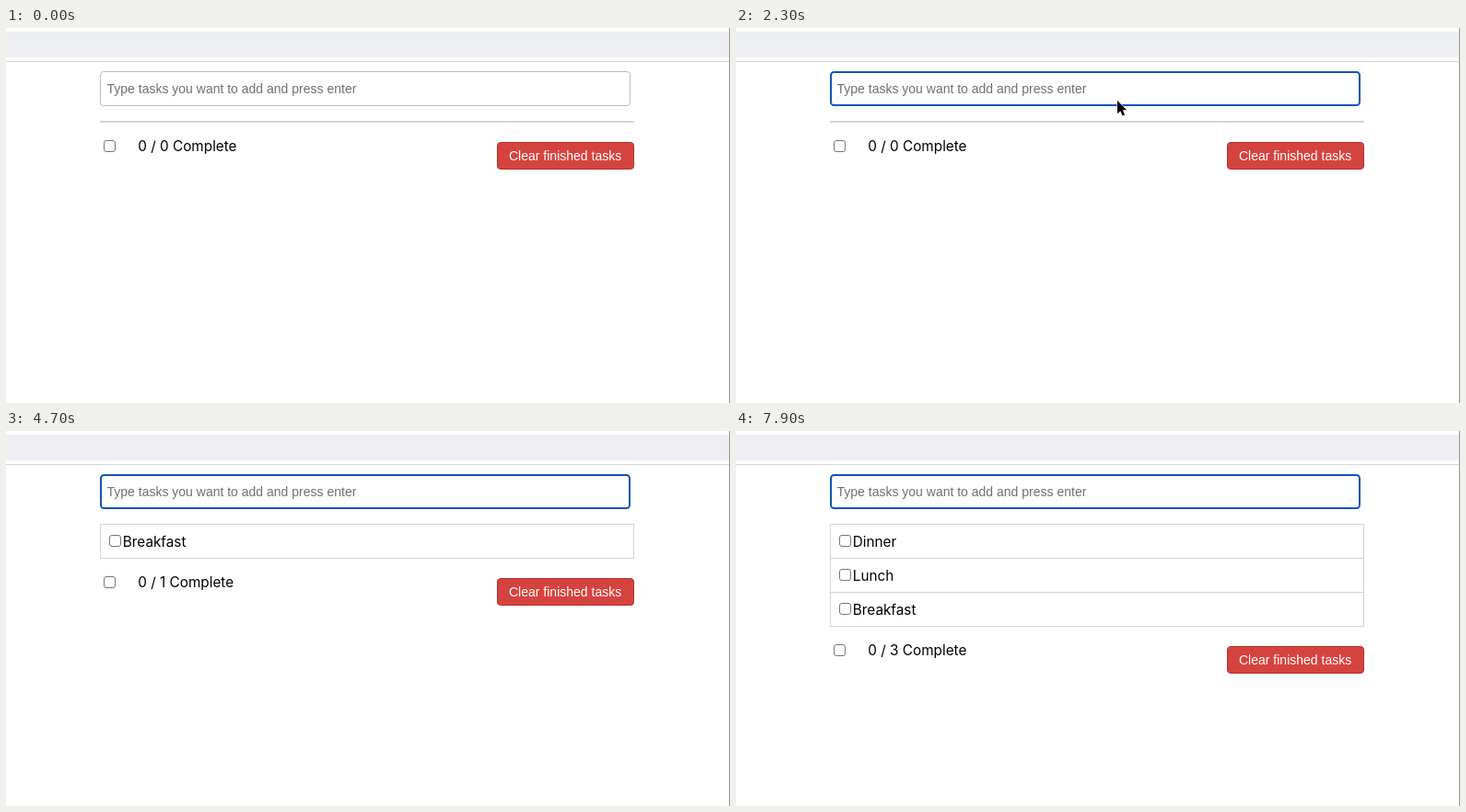
These frames come from a looping animation (786x408 px, 8 s). An HTML page:

```html
<!DOCTYPE html>
<html lang="en">
<head>
<meta charset="utf-8">
<title>Task list</title>
<style>
  html, body { margin: 0; width: 100%; height: 100%; overflow: hidden; background: #fff; }
  svg { display: block; }
  .label { font: 15.3px Inter, sans-serif; }
  .control { font: 14px "Liberation Sans", Arial, sans-serif; }
  .box { fill: #fff; stroke: #767676; }
  .line { fill: none; stroke: #d4d4d4; }
</style>
</head>
<body>
<svg width="786" height="408" viewBox="0 0 786 408">
  <defs>
    <rect id="checkbox" class="box" width="12" height="12" rx="2.5"/>
  </defs>
  <rect y="4" width="785" height="28" fill="#eeeff3"/>
  <path class="line" d="M0 36.5H785"/>
  <path d="M785.5 0V408" stroke="#929292"/>

  <rect id="field" fill="#fff"/>
  <text id="entry" class="control" x="109.5" y="71"></text>
  <rect id="caret" y="58" width="1" height="16"/>

  <rect id="list" class="line" x="102.5" y="101.5" width="579"/>
  <g id="rows"></g>

  <g id="footer">
    <use href="#checkbox" x="106.5" y="122.5"/>
    <text id="count" class="label" x="143.3" y="134"></text>
    <rect x="533.5" y="124.5" width="148" height="29" rx="3.5" fill="#d5433f" stroke="#b52f2b"/>
    <text class="control" x="546" y="144" fill="#fff">Clear finished tasks</text>
  </g>

  <path id="pointer" d="M0 0V14.2L3.3 11.2L5.6 16.4L8 15.4L5.8 10.3H10.2Z"
        stroke="#fff" stroke-width="1.2" paint-order="stroke"/>
</svg>
<script>
const LOOP = 8000, STEP = 100, FOCUS = 1700;
const PLACEHOLDER = 'Type tasks you want to add and press enter';

// One key time per letter; enter commits the word to the list.
const tasks = [
  { word: 'Breakfast', keys: [2900, 3000, 3200, 3300, 3500, 3700, 3800, 4000, 4200], enter: 4600 },
  { word: 'Lunch', keys: [5200, 5500, 5700, 5900, 6100], enter: 6300 },
  { word: 'Dinner', keys: [6500, 6600, 6800, 7000, 7100, 7200], enter: 7500 },
];
const pointerPath = [[300, 762, 355], [800, 163, 62], [1300, 414, 79]];

const el = id => document.getElementById(id);
const [field, entry, caret, list, rows, footer, count, pointer] =
  ['field', 'entry', 'caret', 'list', 'rows', 'footer', 'count', 'pointer'].map(el);

function set(node, attributes) {
  for (const name in attributes) node.setAttribute(name, attributes[name]);
}
const show = (node, visible) => set(node, { visibility: visible ? 'visible' : 'hidden' });

function pointerAt(t) {
  for (let i = 1; i < pointerPath.length; i++) {
    const [t0, x0, y0] = pointerPath[i - 1], [t1, x1, y1] = pointerPath[i];
    if (t < t1) {
      const u = Math.max(0, (t - t0) / (t1 - t0)), k = u * u * (3 - 2 * u);
      return [x0 + (x1 - x0) * k, y0 + (y1 - y0) * k];
    }
  }
  return pointerPath.at(-1).slice(1);
}

function drawField(t) {
  const focused = t >= FOCUS;
  const current = tasks.find(task => t < task.enter);
  const typed = current ? current.word.slice(0, current.keys.filter(k => k <= t).length) : '';
  const inset = focused ? 1 : 0.5;
  set(field, {
    x: 102 + inset, y: 47 + inset, width: 576 - 2 * inset, height: 38 - 2 * inset, rx: 3.5,
    stroke: focused ? '#0a55b5' : '#bcbcbc', 'stroke-width': 2 * inset,
  });
  entry.textContent = typed || PLACEHOLDER;
  set(entry, { fill: typed ? '#000' : '#6f6f6f' });

  const waiting = focused && t < tasks[0].keys[0] && (t - FOCUS) % 1000 < 500;
  show(caret, typed || waiting);
  set(caret, { x: Math.round(109.5 + (typed ? entry.getComputedTextLength() : 0)) });
}

function drawList(t) {
  const done = tasks.filter(task => t >= task.enter).reverse();
  const height = done.length * 37 || 1;
  set(list, { height });
  rows.innerHTML = done.map(({ word }, i) => `
    <g transform="translate(0 ${37 * i})">
      ${i ? '<path class="line" d="M103 101.5H681"/>' : ''}
      <use href="#checkbox" x="112.5" y="113.5"/>
      <text class="label" x="126.8" y="126">${word}</text>
    </g>`).join('');
  set(footer, { transform: `translate(0 ${height - 1})` });
  count.textContent = `0 / ${done.length} Complete`;
}

let lastTime = -1;
function frame(now) {
  const t = Math.floor(now % LOOP / STEP) * STEP;
  if (t !== lastTime) {
    lastTime = t;
    drawField(t);
    drawList(t);
    show(pointer, t >= pointerPath[0][0] && t < tasks[0].keys[0]);
    set(pointer, { transform: `translate(${pointerAt(t)})` });
  }
  requestAnimationFrame(frame);
}
requestAnimationFrame(frame);
</script>
</body>
</html>
```
